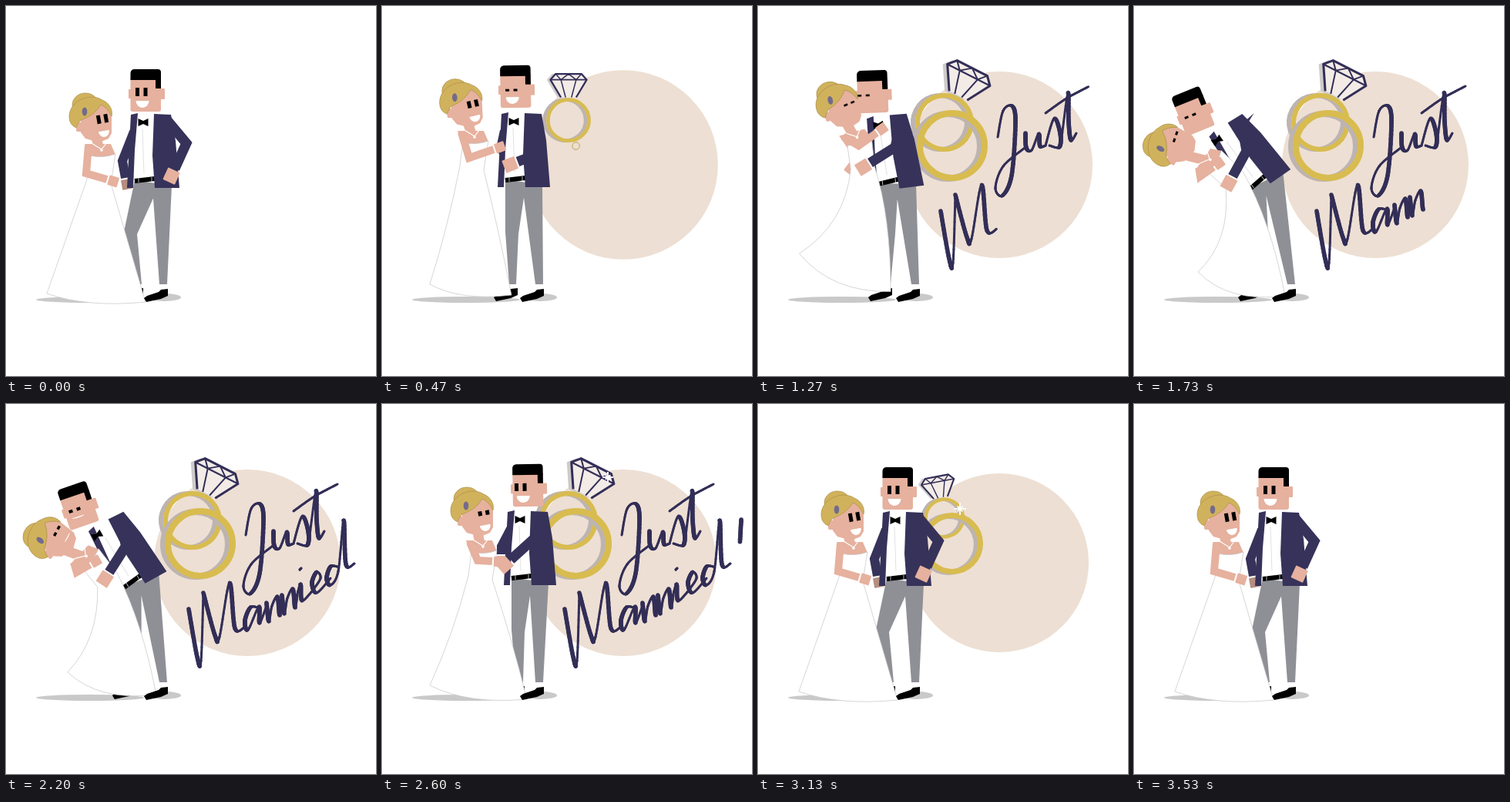
These frames come from a looping animation (480x480 px, 3590 ms). An HTML page with a canvas:

```html
<!DOCTYPE html>
<html lang="en">
<head>
<meta charset="utf-8">
<title>Wedding couple</title>
<style>
  html, body { margin: 0; width: 100%; height: 100%; overflow: hidden; background: #fff; }
  canvas { display: block; width: 480px; height: 480px; }
</style>
</head>
<body>
<canvas id="stage" width="480" height="480"></canvas>
<script>
const g = document.getElementById('stage').getContext('2d');
const LOOP = 3590, STEP = 1000 / 15;
const SKIN = '#e6b19e', SHADE = '#b48e80', NAVY = '#36325a', GREY = '#8f9096', HAIR = '#d1b25c',
  RIM = '#a9914b', GOLD = '#d8bc4f', DULL = '#bdb4b1', BEIGE = '#eddfd3', INK = '#322e57';

// head, face: x, y, tilt, eye height; body, bust: x, y, lean; limbs: elbow, wrist;
// legs: knee, ankle; gown: left hem, right hem, bend.
const stand = {
  head: [181, 109, 0, 11], look: [0, 1], body: [181, 139, 0], near: [234, 178, 219, 211],
  far: [151, 201, 155, 223], legs: [161, 172],
  face: [115, 150, 0, 11], bust: [120, 179, 0], arm: [104, 217, 131, 225], gown: [53, 373, 181, 384, 0]
};
const hug = {
  head: [173, 104, -1, 3], look: [0, 1], body: [174, 138, 0], near: [207, 190, 176, 202],
  far: [154, 185, 158, 190], legs: [168, 170],
  face: [108, 131, -3, 9], bust: [116, 162, 0], arm: [113, 197, 145, 186], gown: [62, 361, 168, 375, 4]
};
const kiss = {
  head: [167, 104, 3, 2.5], look: [-8, 0], body: [172, 138, 0], near: [186, 182, 150, 199],
  far: [150, 180, 126, 211], legs: [170, 170],
  face: [124, 120, 0, 2.5], bust: [131, 155, -5], arm: [142, 171, 167, 153], gown: [46, 315, 166, 369, 27]
};
const dip = {
  head: [76, 136, -22, 3], look: [0, 0], body: [112, 157, -34.5], near: [146, 188, 128, 221],
  far: [128, 172, 123, 180], legs: [165, 160],
  face: [52, 180, -61, 3], bust: [90, 198, -55], arm: [86, 221, 103, 209], gown: [83, 345, 196, 376, 24]
};
const rise = {
  head: [189, 105, -1, 10], look: [-4, 1], body: [182, 138, 0], near: [208, 165, 167, 202],
  far: [155, 185, 155, 195], legs: [176, 179],
  face: [122, 145, 0, 6], bust: [127, 177, 0], arm: [124, 203, 143, 204], gown: [62, 365, 188, 383, 6]
};
const poses = [[0, stand], [70, stand], [470, hug], [870, kiss], [1130, kiss],
  [1600, dip], [2070, dip], [2600, rise], [3000, stand], [LOOP, stand]];

const disc = [[130, 0], [470, 124], [530, 130], [730, 121], [3070, 121], [3130, 118], [3330, 0]];
const ringA = [[200, 0], [470, .77], [600, 1.06], [730, 1], [3000, 1], [3130, .71], [3270, 0]];
const ringB = [[400, 0], [470, .12], [670, 1.06], [800, 1], [3070, 1], [3130, .89], [3270, 0]];
const tilt = [[470, 0], [730, 27], [3000, 27], [3130, -10], [3270, -40]];

const lerp = (a, b, k) => a + (b - a) * k;
const clamp = v => Math.max(0, Math.min(1, v));

// Lettering: pen strokes with a start, an end and a smooth line through a few points.
const pen = [];
function stroke(from, to, ...p) { pen.push([from, to, smooth(p)]); }
function smooth(p) {
  const n = p.length / 2, out = [];
  const at = (i, a) => p[2 * Math.max(0, Math.min(n - 1, i)) + a];
  for (let i = 0; i < n - 1; i++) for (let s = 0; s <= 12; s++) {
    const u = s / 12;
    out.push([0, 1].map(a => {
      const [p0, p1, p2, p3] = [-1, 0, 1, 2].map(d => at(i + d, a));
      return p1 + u / 2 * (p2 - p0 + u * (2 * p0 - 5 * p1 + 4 * p2 - p3 + u * (3 * p1 - p0 - 3 * p2 + p3)));
    }));
  }
  return out;
}
function letterR(from, to, x, y) {
  stroke(from, to, x, y, x + 3, y + 24, x + 7, y + 4, x + 14, y - 8, x + 17, y + 16, x + 20, y);
}
// J u s t
stroke(600, 800, 311, 170, 318, 136, 330, 130, 334, 152, 329, 220, 317, 246, 308, 236, 318, 208, 346, 184);
stroke(800, 900, 347, 165, 348, 184, 355, 187, 364, 166, 366, 182, 373, 181);
stroke(900, 1000, 373, 181, 384, 146, 392, 165, 391, 183, 378, 181);
stroke(1030, 1150, 393, 178, 402, 113, 403, 150, 406, 174, 413, 165);
stroke(1150, 1270, 373, 139, 400, 120, 430, 104);
// M a r r i e d
stroke(900, 1000, 237, 266, 248, 328, 253, 333, 256, 245);
stroke(1000, 1270, 256, 245, 271, 300, 277, 302, 290, 232, 297, 291, 310, 289);
stroke(1270, 1450, 327, 264, 317, 264, 310, 281, 314, 293, 328, 263, 329, 284, 338, 262);
letterR(1450, 1600, 338, 258);
letterR(1600, 1760, 358, 248);
stroke(1760, 1850, 376, 254, 382, 234, 384, 255, 397, 243);
stroke(1850, 1970, 397, 243, 408, 226, 403, 218, 397, 232, 403, 245, 421, 226);
stroke(1970, 2130, 430, 211, 421, 211, 416, 226, 421, 235, 431, 217, 438, 151, 441, 208, 452, 207);
stroke(2150, 2190, 381, 215, 383, 213);
// !
stroke(2530, 2620, 466, 150, 464, 186);
stroke(2640, 2700, 465, 200, 465, 203);

function track(keys, t) {
  if (t <= keys[0][0]) return keys[0][1];
  const i = keys.findIndex(k => k[0] > t);
  if (i < 0) return keys[keys.length - 1][1];
  const [a, b] = [keys[i - 1], keys[i]];
  return lerp(a[1], b[1], (t - a[0]) / (b[0] - a[0]));
}
function poseAt(t) {
  const i = poses.findIndex(k => k[0] > t + 1);
  const [ta, a] = poses[i - 1], [tb, b] = poses[i];
  const u = clamp((t - ta) / (tb - ta)), k = u * u * (3 - 2 * u), pose = {};
  for (const key in a) pose[key] = a[key].map((v, j) => lerp(v, b[key][j], k));
  return pose;
}

function trace(p) {
  g.beginPath();
  for (let i = 0; i < p.length; i += 2) g.lineTo(p[i], p[i + 1]);
}
function poly(p, fill) { trace(p); g.closePath(); g.fillStyle = fill; g.fill(); }
function line(p, color, width) { trace(p); g.strokeStyle = color; g.lineWidth = width; g.stroke(); }
function oval(x, y, rx, ry, fill) {
  g.beginPath(); g.ellipse(x, y, rx, ry, 0, 0, 7); g.fillStyle = fill; g.fill();
}
function box(x, y, w, h, r, fill) {
  g.beginPath(); g.roundRect(x, y, w, h, r); g.fillStyle = fill; g.fill();
}
function hoop(r, w, color) {
  g.beginPath(); g.arc(0, 0, r, 0, 7); g.strokeStyle = color; g.lineWidth = w; g.stroke();
}
function place(x, y, deg, scale, draw) {
  g.save(); g.translate(x, y); g.rotate(deg * Math.PI / 180); g.scale(scale, scale); draw(); g.restore();
}
// Point of a leaning frame in stage coordinates.
function from([x, y, deg], dx, dy) {
  const c = Math.cos(deg * Math.PI / 180), s = Math.sin(deg * Math.PI / 180);
  return [x + dx * c - dy * s, y + dx * s + dy * c];
}
function limb(shoulder, [ex, ey, wx, wy], color, width, size, skin) {
  line([...shoulder, ex, ey, wx, wy], color, width);
  place(wx, wy, Math.atan2(wy - ey, wx - ex) * 180 / Math.PI, 1, () => box(2, -size / 2, size, size, 1, skin));
}
function smile(x, y, w, h, k) {
  if (k < .05) return;
  g.beginPath(); g.ellipse(x, y, w, h * k, 0, 0, Math.PI); g.fillStyle = '#fff'; g.fill();
}
function eye(x, y, h) { box(x - 2.5, y - h / 2, 5, h, 0, '#000'); }

function gem(shadow) {
  const edge = [-13, -39, -31, -69, -22, -79, 22, -79, 31, -69, 13, -39];
  if (shadow) return poly(edge, '#cfcbca');
  poly(edge, '#f3ebe6');
  g.lineJoin = 'round';
  line(edge, INK, 3);
  line([-31, -69, 31, -69], INK, 2.2);
  line([-22, -79, -13, -69, 0, -79, 13, -69, 22, -79], INK, 2);
  for (const side of [-1, 1]) line([13 * side, -69, 5 * side, -39], INK, 2);
  g.lineJoin = 'miter';
}
function rings(t) {
  const a = track(ringA, t), b = track(ringB, t), deg = track(tilt, t);
  if (a > 0) for (const shadow of [true, false])
    place(242 - 6 * a * shadow, 148 + 3 * clamp(a * 4 - 3), deg, a, () => {
      gem(shadow);
      hoop(35, 6, shadow ? DULL : GOLD);
    });
  if (b > 0) {
    place(252 - 6 * b, 182, 0, b, () => hoop(42, 8, DULL));
    place(252, 181, 0, b, () => hoop(42, 8, GOLD));
  }
}
function sparkle(x, y, r) {
  for (let i = 0; i < 4; i++) {
    const s = i % 2 ? r * .6 : r;
    place(x, y, i * 45, 1, () => line([-s, 0, s, 0], '#fff', 1.8));
  }
}
function write(t) {
  const keep = 1 - clamp((t - 2800) / 260);
  g.lineCap = 'round';
  for (const [start, end, pts] of pen) {
    const n = Math.round(Math.min(clamp((t - start) / (end - start)), keep) * (pts.length - 1));
    for (let i = 1; i <= n; i++) {
      const [a, b] = [pts[i - 1], pts[i]];
      const down = clamp((b[1] - a[1]) / (Math.hypot(b[0] - a[0], b[1] - a[1]) || 1));
      line([...a, ...b], INK, 3 + 2.6 * down);
    }
  }
  g.lineCap = 'butt';
}

function groomHead([x, y, deg, h], [look, grin]) {
  place(x, y, deg, 1, () => {
    box(-22, -1, 6, 12, 1, SKIN);
    box(17, -2, 8, 14, 1, SKIN);
    box(-19.5, -18, 39.5, 46, 3, SKIN);
    box(-19.5, -27, 39.5, 14, [5, 4, 0, 0], '#000');
    box(13, -14, 7, 12, 0, '#000');
    for (const ex of [-10.5, 0]) eye(ex + look, lerp(6, 2.5, clamp(h / 11)), h);
    smile(-4 + look * .5, 14, 8.5, 9, grin);
  });
}
function brideHead([x, y, deg, h], grin) {
  place(x, y, deg, 1, () => {
    g.strokeStyle = RIM; g.lineWidth = .7;
    oval(-12, -22, 17, 15, HAIR); g.stroke();
    box(-24, 1, 9, 12, 2, SKIN);
    poly([-18, -4, 6, -26, 22, -14, 22, 15, 18, 22, 6, 27, -12, 22, -18, 14], SKIN);
    g.beginPath();
    g.moveTo(-33, -6);
    g.bezierCurveTo(-33, -28, -5, -38, 10, -28);
    g.bezierCurveTo(20, -24, 24, -14, 22, -7);
    g.quadraticCurveTo(16, -19, 8, -22);
    g.quadraticCurveTo(0, -8, -18, -2);
    g.quadraticCurveTo(-22, 2, -24, 8);
    g.quadraticCurveTo(-33, 4, -33, -6);
    g.fillStyle = HAIR; g.fill(); g.stroke();
    oval(-13, -13, 3.3, 5.5, '#736b8c');
    place(10, -3.5, -10, 1, () => {
      eye(-4.8, 0, h);
      eye(4.8, 0, h);
      smile(-1, 15.5, 7, 8, grin);
    });
  });
}
function shoe(x, y) {
  place(x, y, 0, 1, () => poly([0, -2, 4, -5, 19, -10, 22, -13, 31, -14, 31, -5, 22, -1, 3, 3], '#000'));
}
function trousers(body, [knee, ankle]) {
  const l = from(body, -14, 87), r = from(body, 34, 94);
  poly([...l, ...r, 209, 361, 199, 361, (l[0] + r[0]) / 2, (l[1] + r[1]) / 2 + 20,
    knee + 9, 296, ankle + 4, 361, ankle - 5, 361, knee - 8, 293], GREY);
  shoe(ankle - 25, 380);
}
function suit(body) {
  place(...body, 1, () => {
    poly([-13, 0, 13, 0, 13, 84, -15, 84], '#fff');
    line([-4, 20, -2, 78], '#d4d4d8', .7);
    line([-14, 88, 12, 85], '#000', 6);
    line([-9, 84, -9, 90], '#ddd', .8);
    line([8, 83, 8, 89], '#ddd', .8);
    poly([-19, 2, -10, 0, -14, 48, -16, 97, -24, 97], NAVY);
    poly([11, 1, 33, 2, 39, 36, 44, 97, 12, 97, 9, 55], NAVY);
    place(-3 + body[2] * .3, 12, 0, 1, () => poly([-6.5, -5, 0, -2, 6.5, -5, 6.5, 5, 0, 2, -6.5, 5], '#000'));
  });
}
function dress(bust, [lx, ly, rx, ry, bend]) {
  const topL = from(bust, -11, 15), topR = from(bust, 22, 13);
  const [ax, ay] = from(bust, -15, 46), [bx, by] = from(bust, 16, 51);
  g.beginPath();
  g.moveTo(...topL);
  g.lineTo(ax, ay);
  g.quadraticCurveTo((ax + lx) / 2 + bend, (ay + ly) / 2 + bend * .6, lx, ly);
  g.quadraticCurveTo((lx + rx) / 2 - 12 - bend * .2, (ly + ry) / 2 + 13 + bend * .5, rx, ry);
  g.quadraticCurveTo((bx + rx) / 2 + bend * .4, (by + ry) / 2 - bend * .6, bx, by);
  g.lineTo(...topR);
  g.quadraticCurveTo(...from(bust, 6, 19), ...topL);
  g.fillStyle = '#fff'; g.fill();
  g.strokeStyle = '#c4c4c8'; g.lineWidth = .7; g.stroke();
}
function couple(p) {
  limb(from(p.body, -15, 24), p.far, NAVY, 12, 13, p.far[3] > 215 ? SHADE : SKIN);
  trousers(p.body, p.legs);
  suit(p.body);
  groomHead(p.head, p.look);

  line([p.face[0], p.face[1] + 10, ...from(p.bust, 0, 4)], SKIN, 13);
  place(...p.bust, 1, () => poly([-18, 0, 16, 0, 22, 14, -11, 20], SKIN));
  dress(p.bust, p.gown);
  place(...p.bust, 1, () => {
    line([-9, -1, 4, 7, 11, -2], '#fff', 1.2);
    oval(4, 8, 1.8, 1.8, '#fff');
  });
  shoe(179, 381);
  brideHead(p.face, p.look[1]);

  limb(from(p.body, 27, 8), p.near, NAVY, 13, 17, SKIN);
  limb(from(p.bust, -13, 2), p.arm, SKIN, 10, 13, SKIN);
}

function paint(t) {
  g.fillStyle = '#fff';
  g.fillRect(0, 0, 480, 480);
  const r = track(disc, t);
  if (r > 0) oval(313, 206, r, r, BEIGE);
  rings(t);
  write(t);
  oval(109, 381, 70, 4, '#c9c9c9');
  oval(205, 378, 22, 5, '#c9c9c9');
  couple(poseAt(t));
  if (t > 2520 && t < 2740) sparkle(293, 95, 7);
  if (t > 3060 && t < 3220) sparkle(262, 136, 8);
}

const begin = performance.now();
function tick() {
  const t = (performance.now() - begin) % LOOP;
  paint(Math.min(53, Math.floor((t + 4) / STEP)) * STEP);
  requestAnimationFrame(tick);
}
tick();
</script>
</body>
</html>
```
